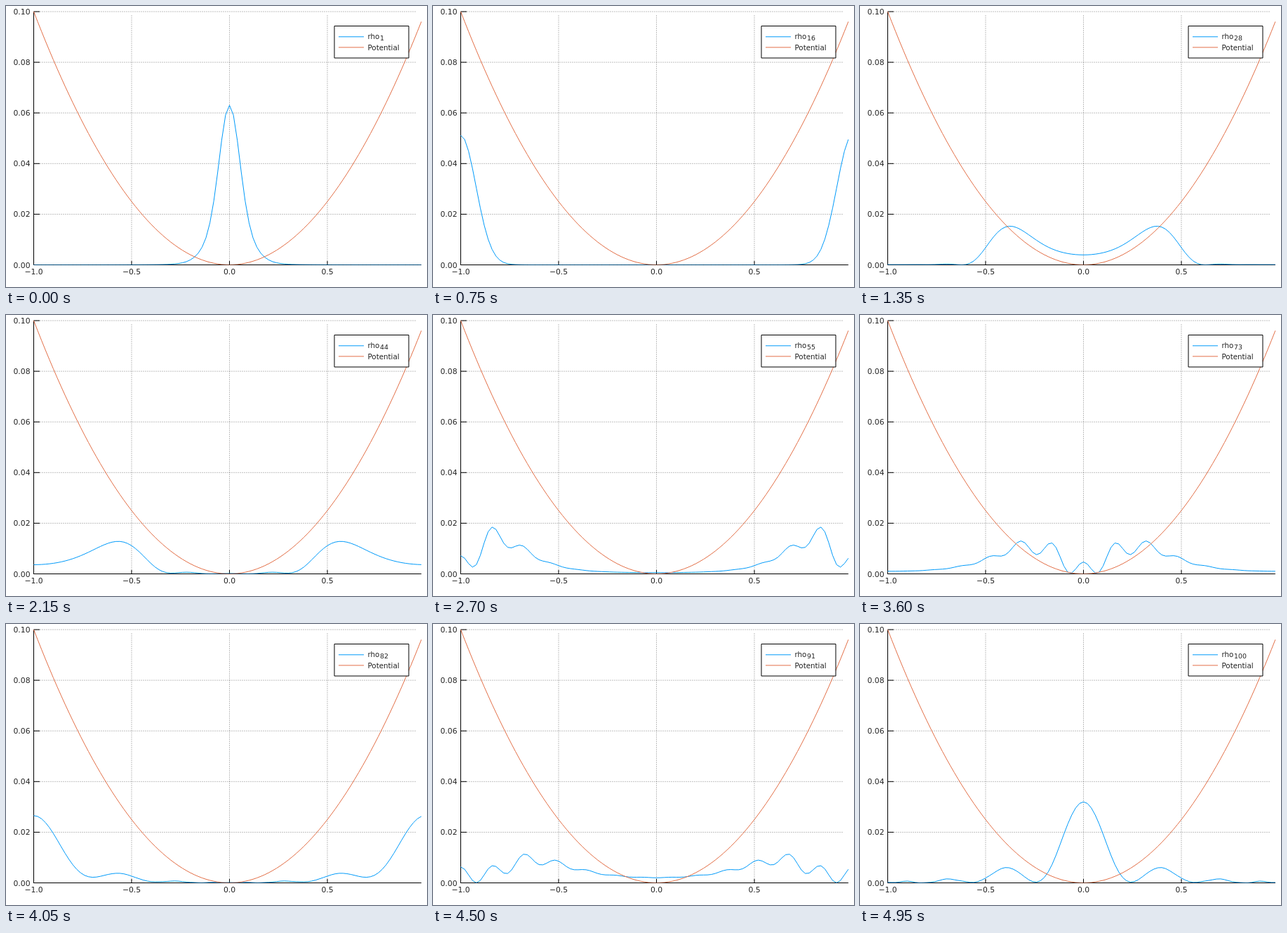
These frames come from a looping animation (600 by 400 pixels, 5 s). An HTML page with a canvas:

```html
<!DOCTYPE html>
<html>
<head>
<meta charset="utf-8">
<style>
html, body { margin: 0; width: 100%; height: 100%; overflow: hidden; background: #fff; }
canvas { display: block; width: 600px; height: 400px; }
</style>
</head>
<body>
<canvas id="plot" width="600" height="400"></canvas>
<script>
const ctx = document.getElementById('plot').getContext('2d');
const BLUE = '#009afa', ORANGE = '#e36f47';
const LEFT = 39.5, RIGHT = 592, TOP = 8, BOTTOM = 368.5;
const STEPS = 100, STEP_MS = 50, MODES = 24;
const xs = Array.from({ length: 100 }, (_, i) => -1 + i * 0.02);
const potential = xs.map(x => 0.1 * x * x);

const px = x => LEFT + (x + 1) * 279;
const py = y => BOTTOM - y * (BOTTOM - TOP) * 10;

// Gaussian packet on a periodic ring; each Fourier mode only turns its phase.
function density(step) {
  const a = Math.PI ** 2 * 0.0002;
  const waves = [];
  for (let n = 1; n <= MODES; n++) {
    const size = 2 * Math.exp(-0.0025 * (Math.PI * n) ** 2);
    const phase = a * (100 * n - n * n) * step;
    waves.push([size * Math.cos(phase), size * Math.sin(phase)]);
  }
  const norm = Math.sqrt(Math.PI * 0.005) / 200;
  return xs.map(x => {
    let re = 1, im = 0;
    waves.forEach(([c, s], i) => {
      const shape = Math.cos(Math.PI * (i + 1) * x);
      re += c * shape;
      im += s * shape;
    });
    return (re * re + im * im) * norm;
  });
}

function line(x1, y1, x2, y2, color = '#000', dash = []) {
  ctx.strokeStyle = color;
  ctx.setLineDash(dash);
  ctx.beginPath();
  ctx.moveTo(x1, y1);
  ctx.lineTo(x2, y2);
  ctx.stroke();
  ctx.setLineDash([]);
}

function curve(values, color) {
  ctx.strokeStyle = color;
  ctx.beginPath();
  values.forEach((v, i) => ctx.lineTo(px(xs[i]), py(v)));
  ctx.stroke();
}

function text(str, x, y, align = 'left', size = 10.3) {
  ctx.font = `${size}px "DejaVu Sans", sans-serif`;
  ctx.textAlign = align;
  ctx.fillStyle = '#222';
  ctx.fillText(str, x, y);
}

function drawAxes() {
  const grid = 'rgba(0,0,0,0.5)', dots = [1, 2];
  for (let i = 0; i <= 5; i++) {
    const v = i * 0.02, y = py(v);
    if (i) line(LEFT, y, 583.5, y, grid, dots);
    line(LEFT, y, 48, y);
    text(v.toFixed(2), 34.5, y + 4, 'right', 10.8);
  }
  for (let i = 0; i < 4; i++) {
    const v = -1 + i / 2, x = px(v);
    if (i) line(x, 13.5, x, BOTTOM, grid, dots);
    line(x, 363, x, BOTTOM);
    text((v < 0 ? '−' : '') + Math.abs(v).toFixed(1), x, 382, 'center', 10.8);
  }
  line(LEFT, TOP, LEFT, BOTTOM + 0.5);
  line(LEFT, BOTTOM, RIGHT, BOTTOM);
}

function drawLegend(step) {
  const box = [468, 28.5, 106, 45.5];
  ctx.fillStyle = '#fff';
  ctx.fillRect(...box);
  ctx.strokeStyle = '#000';
  ctx.strokeRect(...box);
  line(474, 43.8, 510, 43.8, BLUE);
  line(474, 58.9, 510, 58.9, ORANGE);
  text('rho', 515.5, 46.5);
  text(step, 533, 49, 'left', 9.4);
  text('Potential', 515.5, 63);
}

function draw(step) {
  ctx.fillStyle = '#fff';
  ctx.fillRect(0, 0, 600, 400);
  ctx.lineWidth = 1;
  ctx.lineJoin = 'round';
  drawAxes();
  curve(density(step), BLUE);
  curve(potential, ORANGE);
  line(LEFT, BOTTOM, RIGHT, BOTTOM, 'rgba(0,0,0,0.5)');
  drawLegend(step);
}

const start = performance.now();
let shown = 0;
function tick() {
  const step = Math.floor((performance.now() - start) / STEP_MS) % STEPS + 1;
  if (step !== shown) draw(shown = step);
  requestAnimationFrame(tick);
}
tick();
</script>
</body>
</html>
```
